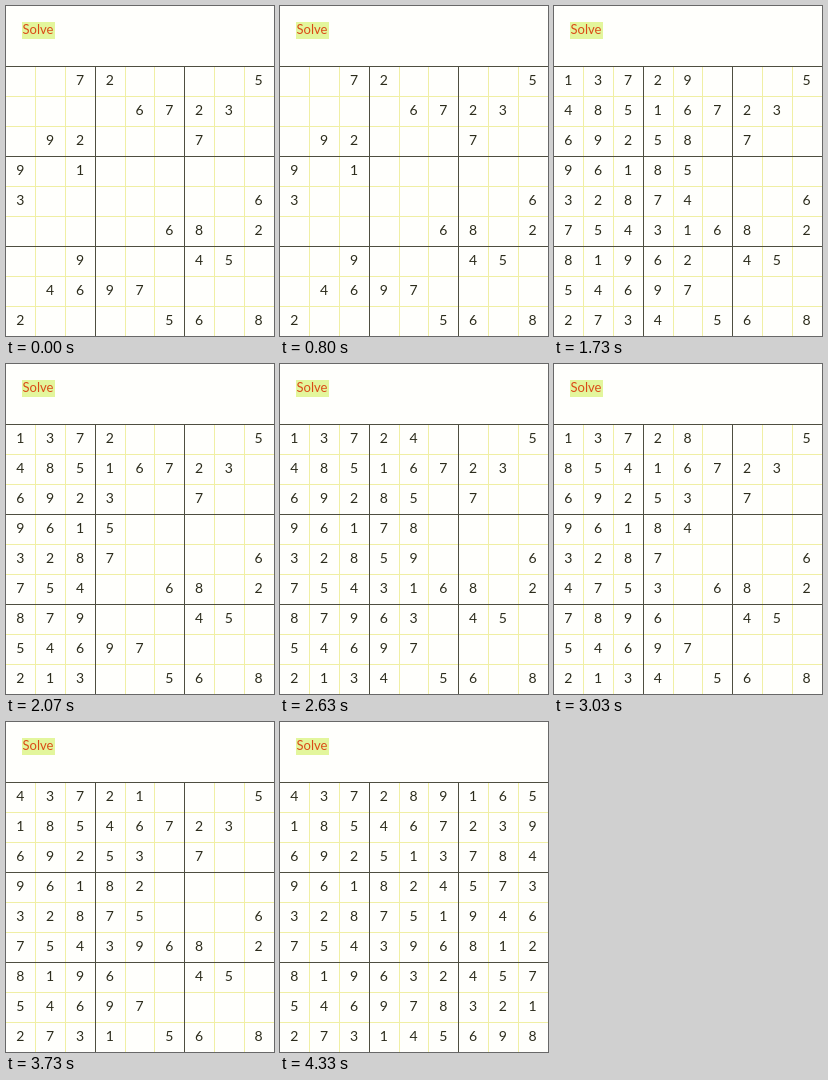
Recreate the animation shown at these times as an HTML page. Size 268x330 px, loop 4.36 s.

```html
<!DOCTYPE html>
<html lang="en">
<head>
<meta charset="utf-8">
<title>Sudoku solver</title>
<style>
  html, body { margin: 0; width: 100%; height: 100%; overflow: hidden; background: #fffffc; }
  svg { display: block; width: 268px; height: 330px; }
  text { font-family: Lato, "Open Sans", sans-serif; }
  .digit { font-size: 14px; fill: #2c2c1c; text-anchor: middle; }
  .solve { font-size: 13px; fill: #da4a16; }
  .thin { stroke: #f0efa4; }
  .thick { stroke: #4e4e40; }
</style>
</head>
<body>
<svg id="stage" viewBox="0 0 268 330">
  <rect x="16" y="16" width="33" height="17" fill="#e3f69c"/>
  <text class="solve" x="16.5" y="28">Solve</text>
</svg>
<script>
const LOOP = 4360;
const FRAMES = 131;
const COL = 268 / 9, ROW = 30, TOP = 60;
const PUZZLE = [
  "..72....5", "....6723.", ".92...7..",
  "9.1......", "3.......6", ".....68.2",
  "..9...45.", ".4697....", "2....56.8"
];

// Search states (columns, top to bottom) and the frame at which each is reached.
const KEYS = [
  [42, "146937852 389625147 752184963 215843"],
  [62, "146937852 389625741 752184963 21357"],
  [79, "146937852 389625741 752184963 218753694 4658913"],
  [91, "186934752 359627841 742185963 215873694 8634"],
  [112, "416937852 389625147 752184963 245873691 163259"]
].map(([frame, text]) => ({ frame, path: text.replace(/ /g, ""), step: -1 }));

const svg = document.getElementById("stage");
const clamp = (v, lo, hi) => Math.min(hi, Math.max(lo, v));

function add(tag, attrs) {
  const el = document.createElementNS("http://www.w3.org/2000/svg", tag);
  for (const name in attrs) el.setAttribute(name, attrs[name]);
  return svg.appendChild(el);
}

function drawGrid() {
  const draw = thick => {
    const attrs = { class: thick ? "thick" : "thin" };
    for (let i = 0; i < 9; i++) {
      if ((i % 3 === 0) !== thick) continue;
      const y = TOP + ROW * i + 0.5, x = Math.floor(COL * i) + 0.5;
      add("line", { ...attrs, x1: 0, x2: 268, y1: y, y2: y });
      if (i) add("line", { ...attrs, x1: x, x2: x, y1: TOP, y2: 330 });
    }
  };
  draw(false);
  draw(true);
}

// Cells are numbered down each column, the order the search visits them.
const start = Array.from({ length: 81 }, (_, i) => +PUZZLE[i % 9][Math.floor(i / 9)] || 0);

// Plain backtracking; returns every placement and removal as cell * 10 + value.
function solve() {
  const board = start.slice(), moves = [];
  const rows = Array(9).fill(0), cols = Array(9).fill(0), boxes = Array(9).fill(0);

  const toggle = (cell, value) => {
    const r = cell % 9, c = Math.floor(cell / 9), bit = 1 << value;
    rows[r] ^= bit;
    cols[c] ^= bit;
    boxes[Math.floor(r / 3) * 3 + Math.floor(c / 3)] ^= bit;
  };
  const used = cell => {
    const r = cell % 9, c = Math.floor(cell / 9);
    return rows[r] | cols[c] | boxes[Math.floor(r / 3) * 3 + Math.floor(c / 3)];
  };
  const mark = cell => {
    for (const key of KEYS) {
      if (key.step < 0 && key.path.length === cell + 1 &&
          board.slice(0, cell + 1).join("") === key.path) key.step = moves.length;
    }
  };
  const search = cell => {
    while (cell < 81 && start[cell]) cell++;
    if (cell === 81) return true;
    const taken = used(cell);
    for (let v = 1; v <= 9; v++) {
      if (taken >> v & 1) continue;
      board[cell] = v;
      toggle(cell, v);
      moves.push(cell * 10 + v);
      mark(cell);
      if (search(cell + 1)) return true;
      toggle(cell, v);
      board[cell] = 0;
      moves.push(cell * 10);
    }
    return false;
  };

  start.forEach((v, cell) => v && toggle(cell, v));
  search(0);
  return moves;
}

// The search idles for a second, runs through the key states, then rests when done.
function timeline(total) {
  const keys = KEYS.map(k => [k.frame, k.step]);
  const first = keys[0], last = keys[keys.length - 1];
  const rate = (last[1] - first[1]) / (last[0] - first[0]);
  const begin = clamp(first[0] - first[1] / rate, 32, first[0] - 1);
  const end = clamp(last[0] + (total - last[1]) / rate, last[0] + 2, 127);
  return [[begin, 0], ...keys, [end, total]];
}

function stepAt(knots, n) {
  if (n <= knots[0][0]) return 0;
  for (let i = 1; i < knots.length; i++) {
    const [n0, s0] = knots[i - 1], [n1, s1] = knots[i];
    if (n <= n1) return Math.round(s0 + (s1 - s0) * (n - n0) / (n1 - n0));
  }
  return knots[knots.length - 1][1];
}

function buildBoards() {
  const moves = solve(), knots = timeline(moves.length);
  const board = start.slice(), boards = [];
  let done = 0;
  for (let n = 0; n < FRAMES; n++) {
    for (const step = stepAt(knots, n); done < step; done++) {
      board[Math.floor(moves[done] / 10)] = moves[done] % 10;
    }
    boards.push(board.slice());
  }
  return boards;
}

drawGrid();
const cells = start.map((_, i) => add("text", {
  class: "digit",
  x: COL * (Math.floor(i / 9) + 0.5) - 0.5,
  y: TOP + ROW * (i % 9) + 19
}));
const boards = buildBoards();
let shown = -1;

function render(time) {
  const t = Math.floor((time % LOOP) / 10) * 10;
  const n = clamp(Math.floor((t + 5) * 0.03), 0, FRAMES - 1);
  if (n === shown) return;
  shown = n;
  boards[n].forEach((v, i) => { cells[i].textContent = v || ""; });
}

function tick() {
  render(performance.now());
  requestAnimationFrame(tick);
}
tick();
</script>
</body>
</html>
```
